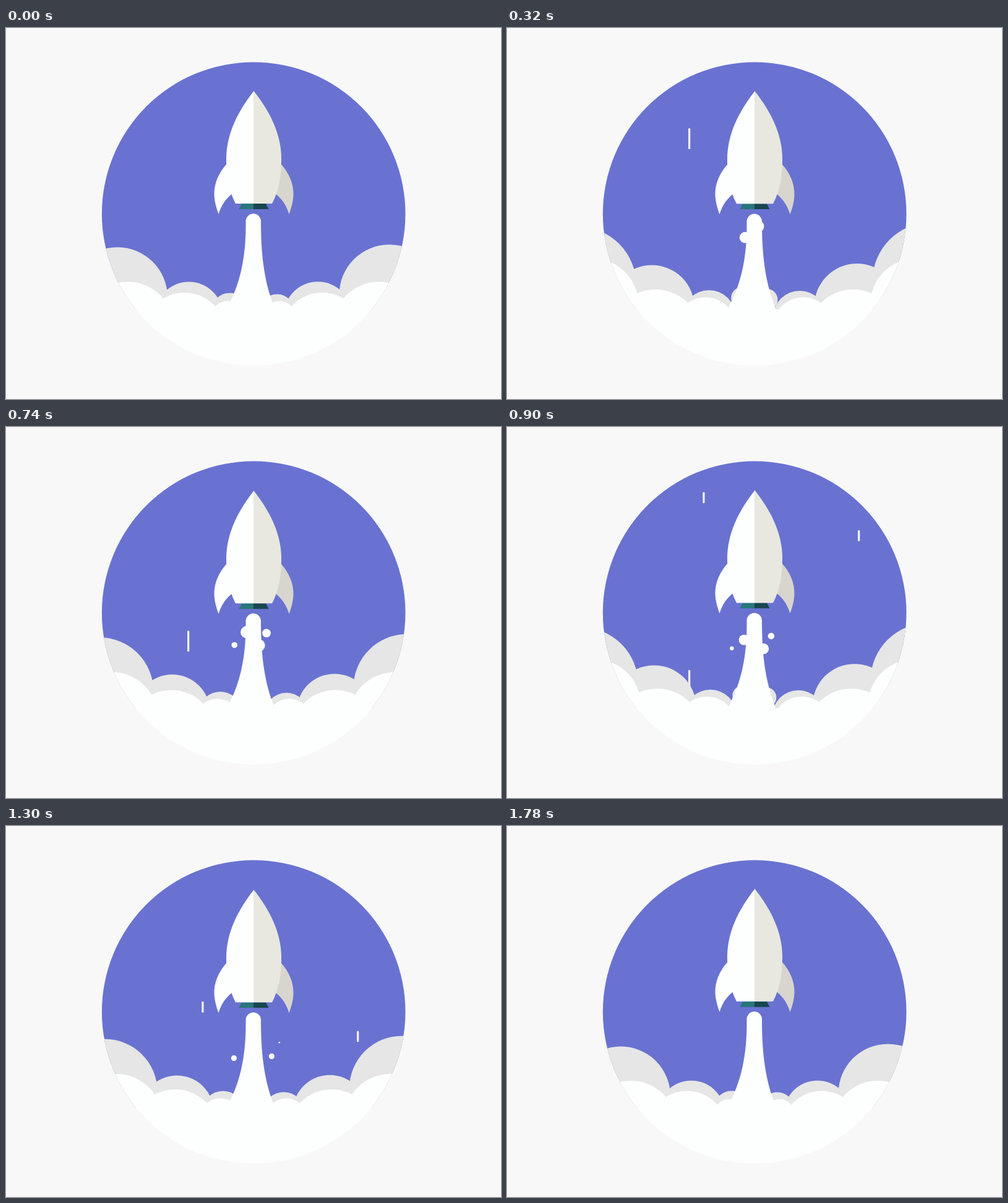
An HTML page with a canvas that plays this animation: 800 by 600 pixels, repeating every 1800 ms.

```html
<!DOCTYPE html>
<html>
<head>
<meta charset="utf-8">
<title>Rocket</title>
<style>
html, body { margin: 0; width: 100%; height: 100%; overflow: hidden; background: #f8f8f8; }
canvas { display: block; }
</style>
</head>
<body>
<canvas id="stage" width="800" height="600"></canvas>
<script>
const ctx = document.getElementById('stage').getContext('2d');
const LOOP = 1800, BEAT = 600, GROUND = 455;
const WHITE = '#fdfefe', GREY = '#e6e6e6';

// A puff lives four beats: reach is its distance from the middle, crest the
// height of its top, both given at each beat; size and tilt are rules.
const banks = [
  {
    color: GREY,
    reach: [0, 38, 104, 219.5, 343],
    crest: [404, 429.5, 410.5, 352.5, 287],
    size: age => 3.5 + 25.8 * age,
    tilt: reach => 1.8 - .018 * reach
  },
  {
    color: WHITE,
    reach: [0, 42, 111, 202.5, 312.5],
    crest: [440, 441.5, 428, 410.5, 334],
    size: age => 74 * smooth(age / 2.5),
    tilt: () => 0
  }
];

const bubbles = [
  { side: -1, end: 1220, endY: 368.5, fall: .033 },
  { side: 1, end: 1430, endY: 354, fall: .03 },
  { side: -1, end: 1757, endY: 411, fall: .078 },
  { side: 1, end: 1765, endY: 388.5, fall: .0345 }
];

const streaks = [
  { x: 293, length: 34, start: -86, speed: .398 },
  { x: 316.3, length: 18, start: 665, speed: .446 },
  { x: 567, length: 18, start: 496, speed: .4115 }
];

const fin = new Path2D('M358 218C343 234 336 252 336.5 270C337 281 340 291 343.5 300.5C348 286 355 276 365 268L372 262Z');
const body = new Path2D('M400.5 101.5C374 135 356 172 356 211C356 240 360 262 371 283.5H401V101.5Z');
const nozzle = new Path2D('M401 283.5H381L376.5 292.3H401Z');
const plume = new Path2D('M387.5 312A12.2 12.2 0 0 1 412 312C412 360 416 405 432 447L440 475H350L360 447C382 405 388 360 387.5 312Z');

function smooth(x) {
  const u = Math.min(1, x);
  return u * u * (3 - 2 * u);
}

function lerp(keys, age) {
  const i = Math.floor(age);
  return keys[i] + (keys[i + 1] - keys[i]) * (age - i);
}

// Smooth curve through evenly spaced keys, straight beyond both ends
function spline(keys, age) {
  const i = Math.floor(age), u = age - i;
  const b = keys[i], c = keys[i + 1];
  const a = keys[i - 1] ?? 2 * b - c, d = keys[i + 2] ?? 2 * c - b;
  return b + u / 2 * (c - a + u * (2 * a - 5 * b + 4 * c - d + u * (3 * (b - c) + d - a)));
}

function fill(path, color) {
  ctx.fillStyle = color;
  ctx.fill(path);
}

function disc(x, y, r, color) {
  const path = new Path2D();
  path.arc(x, y, r, 0, Math.PI * 2);
  fill(path, color);
}

function band(top, bottom, color) {
  ctx.fillStyle = color;
  ctx.fillRect(0, top, 800, bottom - top);
}

function drawStreak(t, { x, length, start, speed }) {
  const path = new Path2D();
  path.roundRect(x, speed * (t - start), 3.3, length, 1.5);
  fill(path, '#f1f0ee');
}

function drawBank(t, { color, reach, crest, size, tilt }) {
  for (let age = t % BEAT / BEAT; age < 4; age++) {
    const away = lerp(reach, age), top = spline(crest, age), r = size(age);
    for (const side of [-1, 1]) {
      disc(399.8 + side * away, top + side * tilt(away) + r, r, color);
    }
  }
}

function drawBubble(t, { side, end, endY, fall }) {
  const left = end - t;
  if (left < 0 || left > 1200) return;
  disc(399 + side * (47.5 - .037 * left), endY - fall * left, Math.min(10, .01 * left), WHITE);
}

function drawHalf(finColor, bodyColor, nozzleColor) {
  fill(fin, finColor);
  fill(nozzle, nozzleColor);
  fill(body, bodyColor);
}

function drawRocket() {
  drawHalf(WHITE, WHITE, '#27777b');
  ctx.translate(801, 0);
  ctx.scale(-1, 1);
  drawHalf('#d8d5ce', '#e8e8e1', '#17474f');
}

function draw(t) {
  band(0, 600, '#f8f8f8');
  ctx.save();
  ctx.beginPath();
  ctx.arc(400.2, 300.5, 245.3, 0, Math.PI * 2);
  ctx.clip();
  band(0, GROUND, '#6972d1');

  streaks.forEach(s => drawStreak(t, s));
  banks.forEach(b => drawBank(t, b));
  band(GROUND, 600, WHITE);
  bubbles.forEach(b => drawBubble(t, b));

  ctx.translate(0, .8 + 1.1 * Math.sin((t - 20) / BEAT * Math.PI * 2));
  fill(plume, WHITE);
  drawRocket();
  ctx.restore();
}

const begin = performance.now();
function tick() {
  draw((performance.now() - begin) % LOOP);
  requestAnimationFrame(tick);
}
tick();
</script>
</body>
</html>
```
